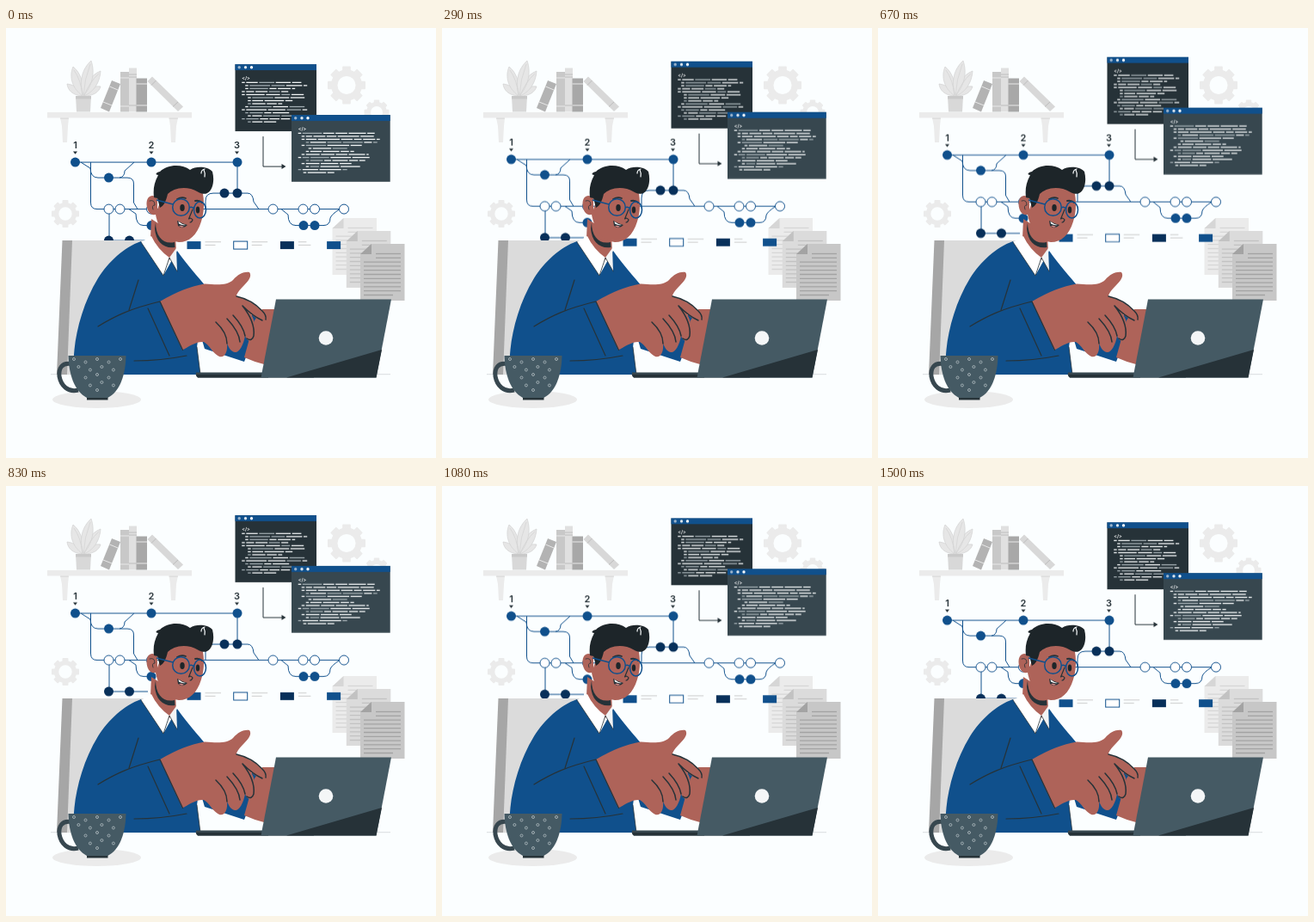
Animation of 500x500 px, one loop 1.54 s. Source, as an HTML page:

```html
<!DOCTYPE html>
<html lang="en">
<head>
<meta charset="utf-8">
<title>Developer at work</title>
<style>
  html, body { margin: 0; width: 100%; height: 100%; overflow: hidden; background: #fbfeff; }
  svg { display: block; width: 100vw; height: 100vh; }
  text { font-family: Inter, Lato, sans-serif; }
  .blue { fill: #10508c; }
  .navy { fill: #08305a; }
  .skin { fill: #ae6359; }
  .wire { fill: none; stroke: #10508c; stroke-width: 1; }
  .open { fill: #fff; stroke: #10508c; stroke-width: 1; }
  .ink { fill: none; stroke: #263238; stroke-width: 1.2; stroke-linecap: round; stroke-linejoin: round; }
</style>
</head>
<body>
<svg viewBox="0 0 500 500">
  <g id="gears" fill="#ebebeb"></g>

  <g id="shelf">
    <path fill="#ebebeb" d="M48 98H216V104.500H200L198 114 197 133H192L191 114 189.500 104.500H73L72 114 71 133H66L65 114 63 104.500H48Z"/>
    <path fill="#dedede" d="M63 104.500H73L72.800 106H63.300ZM189.500 104.500H200L199.700 106H189.800Z"/>
    <g fill="#e6e6e6" stroke="#d2d2d2" stroke-width=".7">
      <path d="M88 79C78 78 72 73 71 65 80 66 87 71 88 79Z"/>
      <path d="M91 79C93 71 100 67 110 68 108 75 101 79 91 79Z"/>
      <path d="M89 79C77 70 73 57 78 45 87 52 91 65 89 79Z"/>
      <path d="M91 79C92 65 98 55 110 50 109 64 102 74 91 79Z"/>
      <path d="M90 79C84 62 89 47 99 38 104 53 100 67 90 79Z"/>
      <path fill="none" d="M90 79Q91 60 98 42M89 78Q87 60 79 49M91 78Q97 63 108 53"/>
    </g>
    <path fill="#d8d8d8" d="M81 79H99L98 97.500H82Z"/>
    <path fill="#c9c9c9" d="M81 79H99V82.500H81Z"/>
    <path fill="#b3b3b3" d="M110 93 123 61 133 65 120 97.500Z"/>
    <path fill="#c8c8c8" d="M133 51H143V97.500H133Z"/>
    <path fill="#e0e0e0" d="M143 46.500H152V97.500H143Z"/>
    <path fill="#a8a8a8" d="M151.500 58.500H164V97.500H151.500Z"/>
    <path fill="#d8d8d8" d="M164.500 62 170 56.500 206 91.500 200 97Z"/>
    <path fill="none" stroke="#e8e8e8" stroke-width="1" d="M120.500 68 130 72M113 86 123 90M133 58H143M133 91H143M151.500 65H164M151.500 90H164"/>
    <path fill="none" stroke="#bdbdbd" stroke-width="1" d="M143 54H152M143 57H152M143 90H152M169 66.500 174.500 61M194 91.500 200 86"/>
  </g>

  <g id="docs"></g>

  <g id="float">
    <path class="wire" d="M80 156H269V192M98.500 156V203Q98.500 210.500 106 210.500H393M87 156 98 163Q98.500 174 107 174H141Q148.500 174 148.500 181V203L153 210.500M132 174Q138 173 138 166L149 156M120 210V247H165M143 210.500 151 216Q151 229.500 160 229.500H169M254 192H241Q232 192 232 201V210M254 192H281Q287 192 288 202L294 210.500M320 210.500 328 217Q328 229.500 337 229.500H369Q377 229.500 377 221Q378 217 388 210.500"/>
    <g id="nodes"></g>
    <g id="legend"></g>
    <path class="ink" style="stroke-width:1;stroke-linecap:butt" d="M299 126V161H321"/>
    <path fill="#263238" d="M320.500 158 325.500 161 320.500 164Z"/>
    <g id="windows"></g>
  </g>

  <path d="M52 402.700H447" stroke="#d0d4d6" stroke-width=".8"/>

  <g id="chair">
    <path fill="#dbdbdb" d="M76 247H172V403H70Z"/>
    <path fill="#a6a6a6" d="M65.500 247H77L71 403H59Z"/>
  </g>

  <g id="person">
    <path class="blue" d="M224 350 300 330 277 388 231 373Z"/>
    <path class="skin" d="M277 383 289 340 298 327H314L300 391Q288 388 277 383Z"/>
    <path class="blue" d="M157 248C137 255 119 272 107 291 91 317 82 349 79.500 374Q77 393 82 403H226L222 371 232 300C223 289 211 276 199 259L184 286Z"/>
    <path class="skin" d="M169 222 168 244 183 276 198 262 197 240Z"/>
    <path fill="#263238" d="M174 226C174 243 183 252 196 249L196.500 255C184 257 174 249 173 233Z"/>
    <path fill="#fff" d="M157 249 169 242Q176 257 190 267L183 288Z"/>
    <path fill="#f2f4f5" d="M190 267 198 256 199 283Z"/>
    <path class="ink" style="stroke-width:.8" d="M157 249 183 288 190 267 199 283"/>

    <path class="skin" d="M184 188C196 180 225 184 229 193 231 205 230 216 227 225 222 241 213 249 201 249 187 247 178 237 174 217Z"/>
    <path class="skin" d="M176 198C171 192 163 195 163.500 205 164 214 169 220 176 216Z"/>
    <path class="ink" style="stroke-width:.8" d="M167 201Q173 199 173 206Q169 206 171 211"/>
    <path fill="#1d2529" d="M172 197C171 188 172 180 177 171 173 171 174 168 179 167 188 158 205 158 214 165 221 160 235 161 240 167 243 178 240 189 234 192 228 195 222 189 215 187 203 184 193 188 188 193 186 202 183 207 179 209L176 198Z"/>
    <path fill="none" stroke="#fbfeff" stroke-width="1.200" stroke-linecap="round" d="M231 164Q227 165 227 169M231 173Q232 169 230 165"/>
    <path class="ink" style="stroke-width:1.800" d="M199 199Q204 196 209 198M220 201Q225 200 228 203"/>
    <ellipse cx="205" cy="209" rx="2.700" ry="4" fill="#1d2529"/>
    <ellipse cx="223" cy="211.500" rx="2.200" ry="4" fill="#1d2529"/>
    <path class="ink" d="M217 211 212.500 222Q215 220 217 223Q216 226 214 226"/>
    <path fill="#263238" d="M199 224Q204 227 211 229Q206 235 200 230Z"/>
    <path fill="#fff" d="M200.500 225Q204 228 209 229Q205 230 201 227.500Z"/>
    <path fill="#d98986" d="M201 230Q204 229 207 231Q204 233 201 230Z"/>
    <g class="wire" style="stroke-width:1.500">
      <circle cx="203.500" cy="208.500" r="9.800"/>
      <ellipse cx="225.500" cy="211.500" rx="7" ry="9.500"/>
      <path d="M213 209Q216 207 218.500 210M194 205 175 200"/>
    </g>

    <path class="skin" d="M179 318C198 307 215 300 231 297.500 248 299 257 299 264 293 270 286 277 283 283 284 286 288 283 293 277 299 271 305 268 309 268 312 282 316 296 325 302 333 304 341 298 343 292 338L285 333C291 343 291 355 288 362 285 366 280 364 278 358 276 369 271 378 266 377 261 376 259 371 257 367 258 377 254 384 248 382 240 378 237 369 230 365 221 364 212 371 205 374.500Z"/>
    <path class="ink" style="stroke-width:1.500" d="M268 312Q286 316 298 329Q303 334 302 339M298 340Q287 335 275 323M275 323Q290 342 288 358Q286 365 280 361M264 334Q276 347 278 358M257 338Q271 353 272 365M244 342Q257 354 257 367"/>
    <path class="ink" d="M107 347C128 334 146 326 179 318L205.500 374.500M143 328 154 293M165 326 190 381M149 387Q180 387 210 381"/>
    <path class="ink" style="stroke-width:.8" d="M222 371 226 403"/>
  </g>

  <g id="laptop">
    <path fill="#37474f" d="M221 400.500H305V406.500H223Q220 405 221 400.500Z"/>
    <path fill="#263238" d="M221 403H358V406.500H223Z"/>
    <path fill="#455a64" d="M314 315.500H448L430.500 406.500H296.500Z"/>
    <path fill="#263238" d="M326 406.500 437 374 430.500 406.500Z"/>
    <circle cx="372" cy="360.500" r="8.300" fill="#f4f6f7"/>
  </g>

  <g id="cup">
    <ellipse cx="105.500" cy="432" rx="51.500" ry="10" fill="#ebebeb"/>
    <path fill="none" stroke="#37474f" stroke-width="5" d="M75 390.500C65 389 61 396 62 405 64 416 72 424 84 421"/>
    <path fill="#263238" d="M94 428H118.500V432.500H94Z"/>
    <path fill="#455a64" d="M72.500 381H139.500C139 402 133 423 118 430H94C79 422 73 402 72.500 381Z"/>
    <g id="dots" fill="none" stroke="#b5c0c5" stroke-width=".8"></g>
  </g>
</svg>

<script>
  const put = (id, html) => document.getElementById(id).innerHTML += html;
  const rect = (x, y, w, h, attr) => `<rect x="${x}" y="${y}" width="${w}" height="${h}" ${attr}/>`;
  const dot = (x, y, r, attr = '') => `<circle cx="${x}" cy="${y}" r="${r}" ${attr}/>`;
  const line = (x1, x2, y, color, w = 1) =>
    `<path d="M${x1} ${y}H${x2}" stroke="${color}" stroke-width="${w}"/>`;

  function gear(x, y, r) {
    let teeth = '';
    for (let a = 0; a < 360; a += 45) {
      teeth += rect(x - r * .22, y - r, r * .44, r * .4, `rx="1" transform="rotate(${a} ${x} ${y})"`);
    }
    return teeth + dot(x, y, r * .65, `fill="none" stroke="#ebebeb" stroke-width="${r * .34}"`);
  }
  put('gears', gear(396, 66.5, 22) + gear(431, 98, 14.5) + gear(69, 216, 16));

  function sheet(x, y, fill, dark) {
    let s = `<path fill="${fill}" d="M${x + 13} ${y}h38.500v66h-51.500v-54Z"/>` +
            `<path fill="${dark}" d="M${x + 13} ${y}v12h-13Z"/>`;
    for (let i = 0; i < 11; i++) {
      s += line(x + (i < 2 ? 18 : 4), x + (i === 10 ? 38 : 47), y + 11.5 + i * 4.8, dark, 1.3);
    }
    return s;
  }
  put('docs', sheet(379.5, 221, '#ebebeb', '#d6d6d6') +
              sheet(395.8, 236, '#dbdbdb', '#c2c2c2') +
              sheet(412, 251, '#c7c7c7', '#a3a3a3'));

  const nodes = (cls, list) => list.map(([x, y]) => dot(x, y, 5.5, `class="${cls}"`)).join('');
  put('nodes',
    nodes('blue', [[80.5, 156], [169, 156], [269, 156], [119.5, 174], [169, 229.5], [346, 229.5], [359, 229.5]]) +
    nodes('navy', [[254, 192], [269, 192], [119.5, 247], [143.5, 247]]) +
    nodes('open', [[119.5, 210.5], [132.5, 210.5], [169, 210.5], [310.5, 210.5], [345.5, 210.5], [359, 210.5], [393, 210.5]]) +
    [80.5, 169, 268.5].map((x, i) =>
      `<text x="${x}" y="140" font-size="11" font-weight="600" text-anchor="middle" fill="#263238">${i + 1}</text>` +
      `<path fill="#263238" d="M${x - 2.5} 143.500h5l-2.500 3.200Z"/>`).join(''));

  ['blue', 'open', 'navy', 'blue'].forEach((cls, i) => {
    const x = 210.5 + i * 54.2;
    put('legend', rect(x, 248, 16, 9, `class="${cls}"`));
    if (i < 3) {
      const [a, b] = i < 2 ? [18.5, 12] : [9.5, 14.5];
      put('legend', line(x + 21, x + 21 + a, 248.7, '#ccc') + line(x + 21, x + 21 + b, 252.3, '#ccc'));
    }
  });

  // Each code row is [indent, end], split into strokes by a seeded generator.
  function code(x, y, rows, seed) {
    const rnd = () => (seed = seed * 16807 % 2147483647) / 2147483647;
    return rows.map(([from, to], i) => {
      let s = '', at = from, len = 3.5;
      while (at < to) {
        const end = Math.min(at + len, to);
        s += line(x + at, x + end, y + i * 3.52, rnd() < .72 ? '#f2f5f6' : '#a2adb2', 1.3);
        at = end + 1.6;
        len = 7 + rnd() * 19;
      }
      return s;
    }).join('');
  }

  function pane(x, y, w, h, fill, rows, seed) {
    return rect(x, y, w, h, `fill="${fill}"`) + rect(x, y, w, 7, 'class="blue"') +
      dot(x + 4.7, y + 3.6, 1.7, 'fill="#9db5cc"') +
      dot(x + 12, y + 3.6, 1.7, 'fill="#dfe7ee"') + dot(x + 19, y + 3.6, 1.7, 'fill="#fff"') +
      `<text x="${x + 7.7}" y="${y + 18}" font-size="5.500" font-weight="600" fill="#fff">&lt;/&gt;</text>` +
      code(x + 7.7, y + 21.3, rows, seed);
  }

  put('windows',
    pane(266.5, 42, 94.5, 78, '#263238',
      [[0, 70], [4, 76], [4, 62], [0, 54], [0, 72], [7, 73], [7, 59], [7, 47], [4, 73], [0, 76], [4, 55], [7, 64], [0, 56], [7, 40]], 71) +
    pane(332, 101, 114.7, 77.7, '#37474f',
      [[0, 89], [4, 88], [4, 95], [9, 92], [4, 74], [12, 57], [9, 65], [4, 82], [0, 83], [9, 78], [4, 62], [9, 72], [0, 57], [6, 42]], 29));

  for (let i = 0; i < 5; i++) {
    const y = 385 + i * 9;
    const half = 30 - i * i * 1.1;
    for (let j = -2; j <= 2; j++) {
      const x = 106 + (j + (i % 2 ? .4 : 0)) * 13.5;
      if (Math.abs(x - 106) < half) put('dots', dot(x, y + (j & 1) * 3.5, 1.5));
    }
  }

  // Gentle bob at 24 steps per second, clock rounded down to 10 ms.
  const LOOP = 1540;
  const bob = t => `translate(0px, ${(4.3 * Math.cos(2 * Math.PI * (t + 45) / LOOP) - 4.15).toFixed(2)}px)`;
  const steps = Array.from({ length: 37 }, (_, k) => {
    const t = Math.floor(k * 12.5 / 3) * 10;
    return { offset: t / LOOP, transform: bob(t), easing: 'steps(1, end)' };
  });
  steps.push({ offset: 1, transform: bob(0) });
  document.getElementById('float').animate(steps, { duration: LOOP, iterations: Infinity });
</script>
</body>
</html>
```
